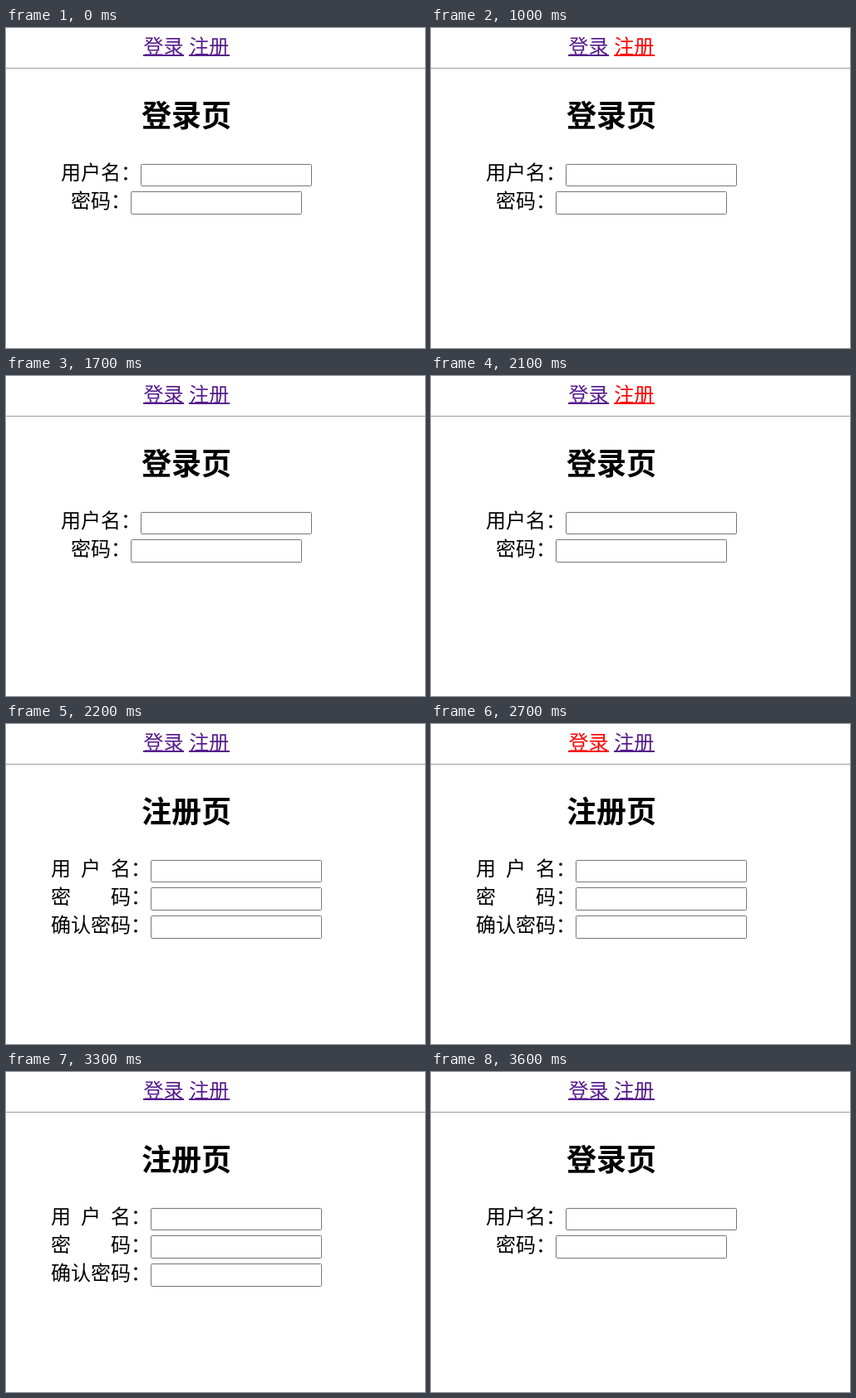
Recreate the animation shown at these times as an HTML page with a canvas. Size 504 by 386 pixels, loop 4.2 s.

```html
<!DOCTYPE html>
<html lang="zh-CN">
<head>
<meta charset="utf-8">
<title>登录 / 注册</title>
<style>
  html, body { margin: 0; width: 504px; height: 386px; overflow: hidden; background: #fff; }
  canvas { display: block; }
</style>
</head>
<body>
<canvas id="stage" width="504" height="386"></canvas>
<script>
const ctx = document.getElementById('stage').getContext('2d');
const FAMILY = '"Noto Sans CJK SC", "Noto Sans CJK", sans-serif';
const VISITED = '#551a8b', ACTIVE = '#ff0000';
const LOOP = 4200;

// Each entry: start time, visible page, link being pressed.
const TIMELINE = [
  [0, 'login'],
  [1000, 'login', 'register'],
  [1200, 'register'],
  [1700, 'login'],
  [2100, 'login', 'register'],
  [2200, 'register'],
  [2700, 'register', 'login'],
  [2800, 'login'],
  [3200, 'login', 'register'],
  [3300, 'register'],
  [3600, 'login']
];

function text(str, x, y, color = '#000', size = 24, weight = 350) {
  ctx.font = `${weight} ${size}px ${FAMILY}`;
  ctx.fillStyle = color;
  ctx.fillText(str, x, y);
}

function heading(str) {
  text(str, 163, 119, '#000', 36, 700);
}

function link(str, x, pressed) {
  text(str, x, 30.5, pressed ? ACTIVE : VISITED);
  ctx.fillRect(Math.floor(x), 32, 49, 2);
}

function rule(y, color) {
  ctx.fillStyle = color;
  ctx.fillRect(0, y, 504, 1);
}

function input(x, y, height) {
  ctx.strokeStyle = '#767676';
  ctx.lineWidth = 1;
  ctx.beginPath();
  ctx.roundRect(x + 0.5, y + 0.5, 205, height - 1, 1);
  ctx.stroke();
}

const pages = {
  login() {
    heading('登录页');
    text('用户名：', 66, 183);
    input(162, 164, 27);
    text('密码：', 78, 217);
    input(150, 197, 28);
  },
  register() {
    heading('注册页');
    text('用', 54, 183);
    text('户', 90, 183);
    text('名：', 126, 183);
    input(174, 164, 27);
    text('密', 54, 217);
    text('码：', 126, 217);
    input(174, 197, 28);
    text('确认密码：', 54, 251);
    input(174, 231, 28);
  }
};

function draw(time) {
  const [, page, pressed] = TIMELINE.filter(([start]) => start <= time).pop();
  ctx.fillStyle = '#fff';
  ctx.fillRect(0, 0, 504, 386);
  link('登录', 165.4, pressed === 'login');
  link('注册', 220.2, pressed === 'register');
  rule(48, '#9a9a9a');
  rule(50, '#eee');
  pages[page]();
}

const origin = performance.now();
function tick() {
  draw((performance.now() - origin) % LOOP);
  requestAnimationFrame(tick);
}
tick();
</script>
</body>
</html>
```
